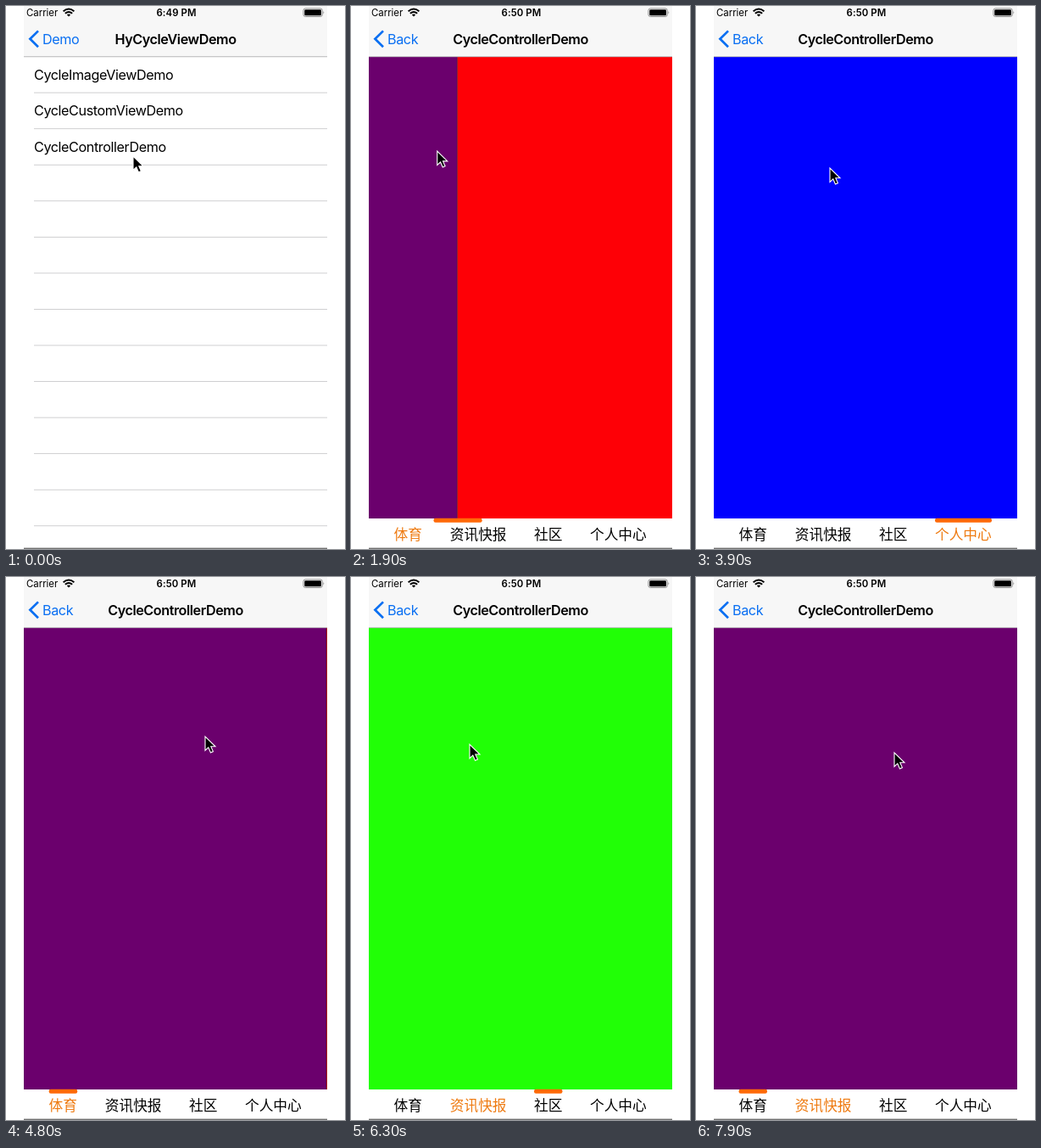
Write an HTML page that moves like this. It is 400 by 640 pixels and loops after 8000 ms.

```html
<!DOCTYPE html>
<html lang="zh-CN">
<head>
<meta charset="utf-8">
<title>Cycle view demo</title>
<style>
html, body { margin: 0; width: 100%; height: 100%; overflow: hidden; background: #fff; }
svg { display: block; width: 400px; height: 640px; }
text { font: 16.2px Inter, "Noto Sans", sans-serif; letter-spacing: -.42px; white-space: pre; }
.title { font-weight: 600; text-anchor: middle; letter-spacing: -.45px; }
.link { fill: #0a6ff2; }
.small { font-size: 11.4px; letter-spacing: 0; }
.clock { font-weight: 600; text-anchor: middle; letter-spacing: .1px; }
.tab { font: 16.7px "Noto Sans CJK SC", "Noto Sans CJK", sans-serif; letter-spacing: 0; }
</style>
</head>
<body>
<svg viewBox="0 0 400 640">
  <defs>
    <clipPath id="stage"><rect x="21" width="358" height="640"/></clipPath>
    <clipPath id="body"><rect x="21" y="60" width="358" height="544"/></clipPath>
  </defs>
  <g clip-path="url(#stage)">
    <g id="list"><rect id="highlight" x="21" y="145" width="358" height="42" fill="#d9d9d9"/></g>
    <rect id="dim" x="21" y="60" width="358" height="580"/>
    <g id="screen">
      <rect x="21" y="60" width="358" height="580" fill="#fff"/>
      <g id="pages" clip-path="url(#body)"></g>
    </g>
    <g id="tabs"></g>
    <rect x="21" width="358" height="60" fill="#f7f7f7"/>
    <rect x="21" y="59.4" width="358" height=".8" fill="#a9a9ab"/>
    <rect x="21" y="638.6" width="358" height="1.4" fill="#717171"/>

    <text class="small" x="24" y="12">Carrier</text>
    <g fill="none" stroke="#000" stroke-width="1.9">
      <path d="M67.6 6.2Q74 .8 80.4 6.2M69.8 8.7Q74 5.1 78.2 8.7"/>
      <path d="M71.8 10.3Q74 8.5 76.2 10.3L74 12.6Z" fill="#000" stroke="none"/>
    </g>
    <text class="small clock" id="clock" x="201" y="12"></text>
    <rect x="350.9" y="2.9" width="22.4" height="9.6" rx="2.4" fill="none" stroke="#777" stroke-width=".8"/>
    <rect x="352.2" y="4.2" width="19.8" height="7" rx="1.3"/>
    <path d="M374.5 5.9q1.6 1.8 0 3.6z" fill="#777"/>

    <path d="M38 29.4L28.4 38.8L38 48.2" fill="none" stroke="#0a6ff2" stroke-width="2.7"/>
    <text class="link" id="oldBack" x="43" y="44.5">Demo</text>
    <text class="link" id="newBack" x="43" y="44.5">Back</text>
    <text class="title" id="oldTitle" x="200" y="44.5">HyCycleViewDemo</text>
    <text class="title" id="newTitle" x="200" y="44.5">CycleControllerDemo</text>
  </g>
  <path id="cursor" d="M0 0V16.4L3.8 12.9L6.5 18.9L9.4 17.6L6.8 11.8H12Z" stroke="#fff" stroke-width="1.1"/>
</svg>
<script>
const LOOP = 8000, STEP = 100, LEFT = 21, WIDTH = 358, PUSH = 633;
const COLORS = ['#6b006d', '#fe0006', '#21ff06', '#0000fe'];
const TABS = [['体育', 50.5, 33.5], ['资讯快报', 116.8, 67], ['社区', 216, 33.5], ['个人中心', 282, 67]];

// start, duration, page before, page after; pages wrap around
const SWIPES = [
  [1450, 700, 0, 1], [2470, 700, 1, 2], [3180, 560, 2, 3], [4000, 700, 3, 4],
  [4780, 700, 4, 5], [5700, 600, 5, 6], [6387, 700, 6, 5], [7200, 700, 5, 4]
];
// time, x, y of the pointer tip
const POINTER = [
  [0, 150, 177], [400, 150, 164], [1000, 150, 163], [1400, 235, 170], [1850, 95, 171],
  [2430, 173, 172], [2700, 82, 172], [2850, 52, 175], [3150, 200, 184], [3500, 70, 190],
  [3900, 158, 191], [4050, 230, 190], [4400, 90, 189], [4800, 235, 188], [5150, 85, 187],
  [5700, 232, 188], [6000, 110, 192], [6400, 150, 199], [6800, 310, 203], [7000, 320, 203],
  [7200, 130, 205], [7600, 262, 206], [7900, 234, 207], [8000, 225, 207]
];

const $ = id => document.getElementById(id);
const clamp = v => Math.max(0, Math.min(1, v));
const mix = (a, b, k) => a + (b - a) * k;
const ease = k => k * k * (3 - 2 * k);
const mod4 = n => ((n % 4) + 4) % 4;

function add(parent, tag, attrs, label) {
  const el = document.createElementNS('http://www.w3.org/2000/svg', tag);
  for (const key in attrs) el.setAttribute(key, attrs[key]);
  if (label) el.textContent = label;
  return parent.appendChild(el);
}
const move = (el, x, y = 0) => el.setAttribute('transform', `translate(${x} ${y})`);

for (let i = 1; i <= 13; i++)
  add($('list'), 'rect', { x: 33, y: 59.2 + 42.55 * i, width: 346, height: .8, fill: '#c4c4c6' });
['CycleImageViewDemo', 'CycleCustomViewDemo', 'CycleControllerDemo'].forEach((name, i) =>
  add($('list'), 'text', { x: 33, y: 86.7 + 42.55 * i }, name));

const pages = [0, 1].map(() => add($('pages'), 'rect', { y: 60, width: WIDTH, height: 544 }));
const seam = add($('pages'), 'rect', { y: 60, width: 1, height: 544, fill: '#000', opacity: .45 });
const labels = TABS.map(([name, x]) => add($('tabs'), 'text', { class: 'tab', x, y: 629.3 }, name));
const bar = add($('tabs'), 'rect', { y: 603.8, height: 5, rx: 2.2, fill: '#ff6a08' });

function scrollAt(t) {
  let page = 0, selected = 0;
  for (const [start, length, from, to] of SWIPES) {
    if (t >= start) page = mix(from, to, ease(clamp((t - start) / length)));
    if (t >= start + length + 100) selected = mod4(to);
  }
  return { page, selected };
}

function pointerAt(t) {
  const i = Math.max(1, POINTER.findIndex(p => p[0] > t));
  const [t0, x0, y0] = POINTER[i - 1], [t1, x1, y1] = POINTER[i];
  const k = (t - t0) / (t1 - t0);
  return [mix(x0, x1, k), mix(y0, y1, k)];
}

function drawPush(t) {
  // critically damped spring, 1 before the push and 0 when settled
  const s = Math.max(0, t - PUSH) * .01826;
  const rest = t > 1150 ? 0 : (1 + s) * Math.exp(-s), done = 1 - rest;
  move($('screen'), WIDTH * rest);
  move($('tabs'), WIDTH * 1.63 * rest);
  move($('list'), -107 * done);
  $('dim').setAttribute('opacity', .1 * done);
  $('highlight').setAttribute('opacity', t < 500 ? 0 : clamp((900 - t) / 250));
  move($('oldTitle'), -110 * done);
  move($('newTitle'), 90 * rest);
  move($('oldBack'), -50 * done);
  move($('newBack'), 80 * rest);
  const fade = clamp(1 - done * 1.6), show = clamp(done * 1.5 - .45);
  for (const id of ['oldTitle', 'oldBack']) $(id).setAttribute('opacity', fade);
  for (const id of ['newTitle', 'newBack']) $(id).setAttribute('opacity', show);
}

function drawPages(t) {
  const { page, selected } = scrollAt(t);
  const first = Math.floor(page), part = page - first;
  pages.forEach((el, i) => {
    el.setAttribute('x', LEFT + WIDTH * (i - part));
    el.setAttribute('fill', COLORS[mod4(first + i)]);
  });
  seam.setAttribute('x', LEFT + WIDTH * (1 - part) - .5);
  seam.setAttribute('visibility', part > .002 ? 'visible' : 'hidden');
  const a = TABS[mod4(first)], b = TABS[mod4(first + 1)];
  bar.setAttribute('x', mix(a[1], b[1], part));
  bar.setAttribute('width', mix(a[2], b[2], part));
  labels.forEach((el, i) => el.setAttribute('fill', i === selected ? '#ee7a10' : '#000'));
}

const begin = performance.now();
function frame() {
  const t = Math.floor(((performance.now() - begin) % LOOP) / STEP) * STEP;
  drawPush(t);
  drawPages(t);
  $('clock').textContent = t < 1400 ? '6:49 PM' : '6:50 PM';
  move($('cursor'), ...pointerAt(t));
  requestAnimationFrame(frame);
}
frame();
</script>
</body>
</html>
```
